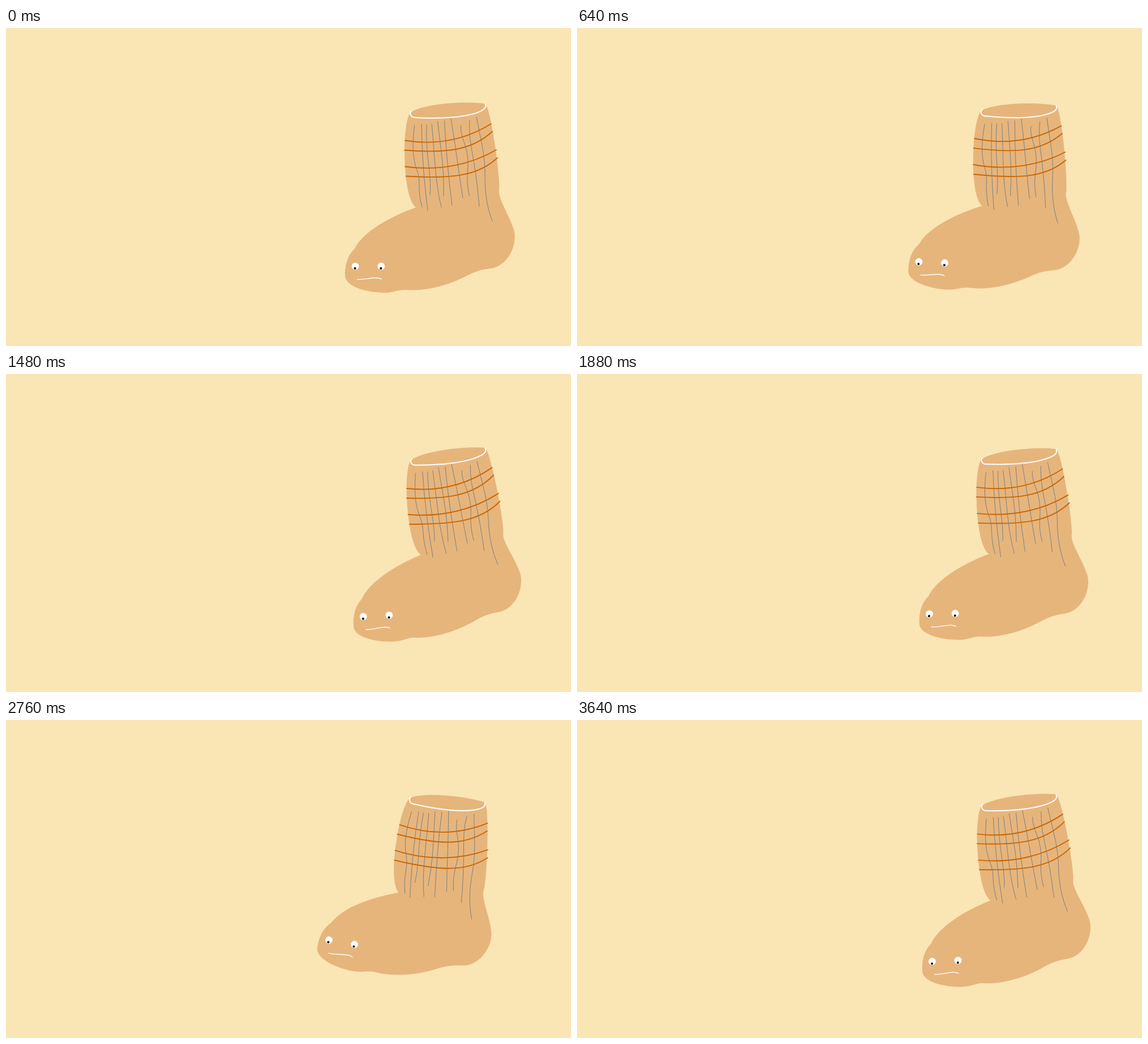
An HTML page with a canvas that plays this animation: 998x561 px, repeating every 4.2 s.

```html
<!DOCTYPE html>
<html lang="en">
<head>
<meta charset="utf-8">
<title>Swinging sock</title>
<style>
  html, body { margin: 0; width: 100%; height: 100%; overflow: hidden; background: #fae5b4; }
  canvas { display: block; width: 998px; height: 561px; }
</style>
</head>
<body>
<canvas id="stage" width="998" height="561"></canvas>
<script>
const ctx = document.getElementById('stage').getContext('2d');

const LOOP = 4200, STEP = 40, LAST_STEP = 3640;
const PIVOT = { x: 778.5, y: 136.5 };

const path = d => new Path2D(d);

const body = path(`M714,149 C735,135 805,128 846,133.5 Q848,134 849,138
  C857,154 871,245 871.5,280 Q870,291 872,296
  C876,312 890,333 897,356 Q898.7,362 898.7,367
  C899,395 880,421 857,424 C838,426 826,431 816,436
  C786,452 745,465 707,462 C692,461 687,467 668,467
  C645,467 601,459 599,438 C598,418 604,400 616,389
  C630,361 675,334 724,316.5 C710,306 704,262 704,215
  C704,185 708,158 714,149 Z`);

const rim = path(`M716,147 C712,151 715,157.5 722,158
  C768,160.5 814,158 838,146.8 C846,143.5 848.8,139 846.5,134`);

const stripes = [
  'M705,198.5 C765,208 815,195 857,169',
  'M704,215.5 C775,221 822,217 859,182.5',
  'M705,244.5 C767,253 823,240 866,215',
  'M706.5,261.5 C785,266 833,262 868,229'
].map(path);

const ribs = [
  'M721.7,172 C716,215 720,235 727,254 C733,272 726,285 735,316',
  'M734,170 C735,230 739,275 745,322',
  'M743,170.5 C741,230 752,255 749,294',
  'M752,169.5 C757,215 757,270 769,316',
  'M762.5,164.5 C768,215 774,245 773,296',
  'M774.5,163.5 C777,215 783,275 788,313',
  'M786,160 C795,215 799,250 807,300',
  'M803.5,172 C802,195 816,205 816,240 C816,255 812,270 818.5,296',
  'M819,163 C816,205 828,220 836,315',
  'M831,157 C838,195 847,225 846,265 C846,295 851,320 859,340.5'
].map(path);

const mouth = path('M620.5,443.3 C634,445 654,437 663,443');

// Cubic Bezier timing curve, solved by bisection.
function timing(x1, y1, x2, y2) {
  const at = (a, b, u) => 3 * u * (1 - u) * ((1 - u) * a + u * b) + u ** 3;
  return x => {
    let lo = 0, hi = 1;
    for (let i = 0; i < 24; i++) {
      const mid = (lo + hi) / 2;
      if (at(x1, x2, mid) < x) lo = mid; else hi = mid;
    }
    return at(y1, y2, lo);
  };
}

const ease = timing(0.25, 0.1, 0.25, 1);
const smooth = x => (1 - Math.cos(Math.PI * x)) / 2;

// Time in ms, angle in degrees, easing towards that angle.
const swing = [
  [0, 0, ease], [480, 10, ease], [805, -5, smooth], [1066, 0, smooth],
  [1657, -3, ease], [2258, 0, ease], [2820, 10, ease], [3140, -5, smooth],
  [3401, 0, smooth], [3988, -3, ease]
];

function angleAt(time) {
  const i = swing.findIndex(key => key[0] > time);
  const [t0, a0] = swing[i - 1];
  const [t1, a1, easing] = swing[i];
  return a0 + (a1 - a0) * easing((time - t0) / (t1 - t0));
}

function stroke(shape, color, width) {
  ctx.strokeStyle = color;
  ctx.lineWidth = width;
  ctx.stroke(shape);
}

function disc(x, y, r, color) {
  ctx.fillStyle = color;
  ctx.beginPath();
  ctx.arc(x, y, r, 0, 2 * Math.PI);
  ctx.fill();
}

function eye(x, y) {
  disc(x, y, 6.4, '#fff');
  disc(x - 0.5, y + 3.8, 2, '#000');
}

function drawSock() {
  ctx.fillStyle = '#e6b57c';
  ctx.fill(body);
  for (const rib of ribs) stroke(rib, '#808080', 1);
  for (const stripe of stripes) stroke(stripe, '#cc6600', 1.9);
  stroke(rim, '#fff', 2);
  stroke(mouth, '#fff', 1.3);
  eye(617, 420.3);
  eye(662.7, 420.2);
}

function frame(now) {
  const time = Math.min(Math.floor((now % LOOP) / STEP) * STEP, LAST_STEP);
  ctx.fillStyle = '#fae5b4';
  ctx.fillRect(0, 0, 998, 561);
  ctx.save();
  ctx.translate(PIVOT.x, PIVOT.y);
  ctx.rotate(angleAt(time) * Math.PI / 180);
  ctx.translate(-PIVOT.x, -PIVOT.y);
  drawSock();
  ctx.restore();
}

ctx.lineCap = 'round';
const start = performance.now();
function tick() {
  frame(performance.now() - start);
  requestAnimationFrame(tick);
}
tick();
</script>
</body>
</html>
```
